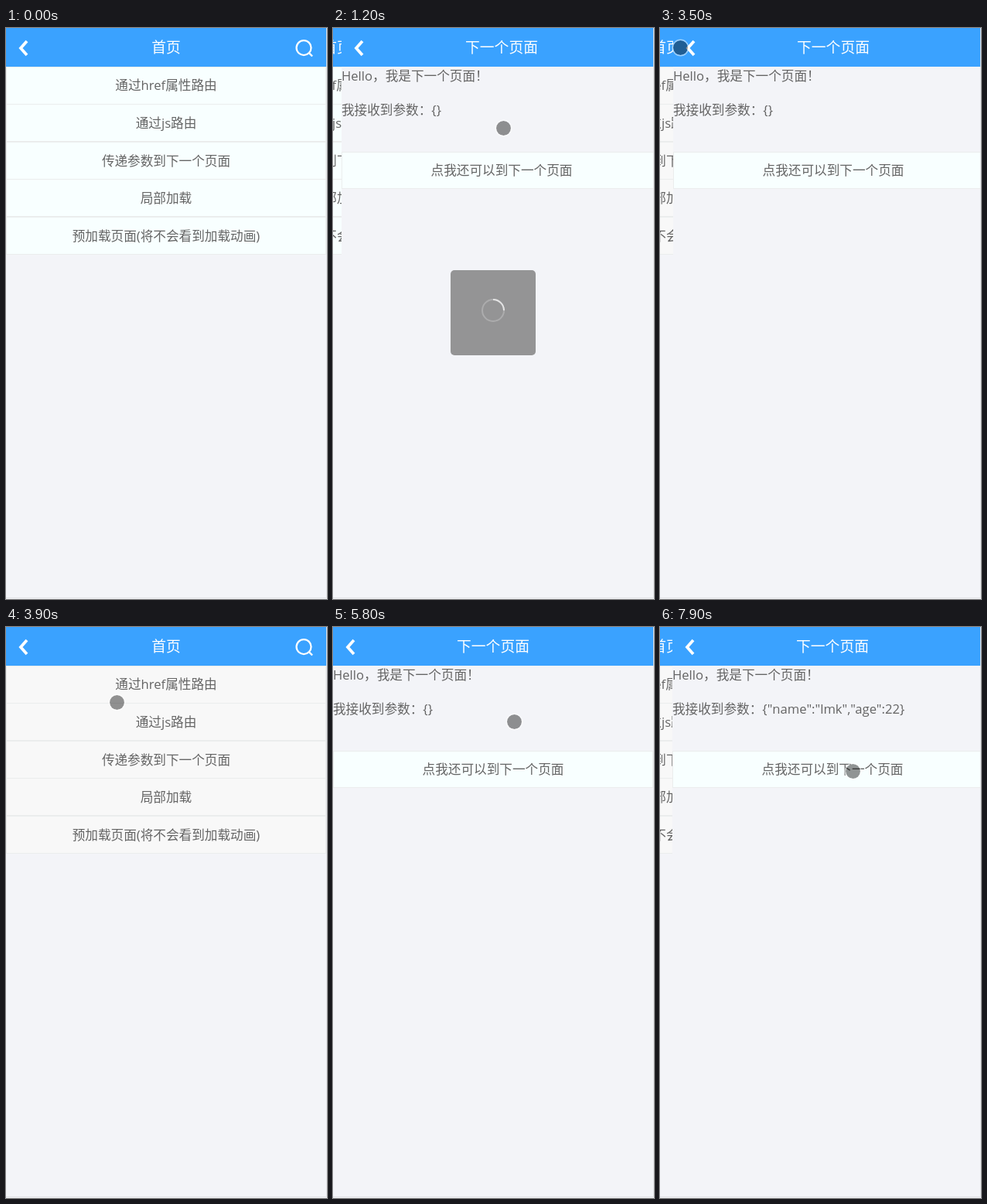
Recreate the animation shown at these times as an HTML page. Size 415x738 px, loop 8 s.

```html
<!DOCTYPE html>
<html lang="zh-CN">
<head>
<meta charset="utf-8">
<style>
  html, body { margin: 0; width: 100%; height: 100%; overflow: hidden; background: #f3f4f8; }
  svg { display: block; }
  text { font: 16.64px 'Open Sans', 'Noto Sans CJK SC', 'Noto Sans CJK', sans-serif; fill: #646464; white-space: pre; }
  .mid { text-anchor: middle; }
  .title { font-size: 18.8px; fill: #fff; text-anchor: middle; }
  .row { fill: #f8ffff; stroke: #ebeded; }
  .icon { fill: none; stroke: #fff; }
</style>
</head>
<body>
<svg id="stage" width="415" height="738" viewBox="0 0 415 738"></svg>
<script>
const LOOP = 8000, SLIDE = 350, WIDTH = 415;

const page = (id, title, content) => `
  <g id="${id}">
    <rect width="415" height="738" fill="#f3f4f8"/>
    <rect width="415" height="50" fill="#3aa2ff"/>
    <path class="icon" d="M27 17L19 26L27 35" stroke-width="3.8"/>
    <text class="title" x="207" y="32">${title}</text>
    ${content}
  </g>`;

const row = (y, height, label) => `
  <rect class="row" x=".5" y="${Math.floor(y) + .5}" width="413" height="${height}"/>
  <text class="mid" x="207" y="${Math.ceil(y) + 30}">${label}</text>`;

const links = ['通过href属性路由', '通过js路由', '传递参数到下一个页面', '局部加载', '预加载页面(将不会看到加载动画)'];
const search = `
  <circle class="icon" cx="385" cy="25.6" r="9.5" stroke-width="2.2"/>
  <path class="icon" d="M391 31.5L396 36.5" stroke-width="2.4"/>`;

document.getElementById('stage').innerHTML =
  page('home', '首页', search + links.map((label, i) => row(50 + i * 48.6, 48, label)).join('')) +
  page('next', '下一个页面', `
    <text y="68">Hello，我是下一个页面！</text>
    <text id="params" y="112"></text>
    ${row(160, 47, '点我还可以到下一个页面')}`) + `
  <path d="M414.5 0V736.5H0" fill="none" stroke="#e2e3e6"/>
  <g id="loader">
    <rect x="152" y="313" width="110" height="110" rx="5" fill="#949495"/>
    <g fill="none" stroke-width="2">
      <circle cx="207" cy="365" r="14" stroke="#acacad"/>
      <path id="spinner" d="M207 351A14 14 0 0 1 221 365" stroke="#e4e4e4"/>
    </g>
  </g>
  <g id="cursor">
    <circle cx=".5" cy=".5" r="9.5" fill="#000" fill-opacity=".42"/>
    <circle cx=".5" cy=".5" r="10.2" fill="none" stroke="#fff" stroke-opacity=".5" stroke-width="1.5"/>
  </g>`;

// Start times; the direction alternates between forward and back.
const slides = [923, 3480, 4680, 6555, 7637];

// Pointer path: time, x, y
const pointer = [
  [100, 369, 80], [700, 223, 107], [800, 223, 107], [1000, 220, 129], [1300, 220, 129],
  [1700, 49, 60], [2200, 26, 25], [3600, 26, 25], [3700, 45, 10], [3900, 143, 97],
  [4200, 234, 124], [5700, 234, 124], [5800, 234, 122], [6400, 31, 30], [6800, 31, 30],
  [7100, 180, 281], [7400, 249, 186], [8000, 249, 186]
];

const clamp = v => Math.max(0, Math.min(1, v));

// cubic-bezier(.25, .1, .25, 1)
function ease(x) {
  if (x <= 0 || x >= 1) return clamp(x);
  const curve = (s, a, b) => 3 * (1 - s) ** 2 * s * a + 3 * (1 - s) * s * s * b + s ** 3;
  let low = 0, high = 1;
  for (let i = 0; i < 20; i++) {
    const s = (low + high) / 2;
    if (curve(s, .25, .25) < x) low = s; else high = s;
  }
  return curve(low, .1, 1);
}

function pointerAt(t) {
  const i = Math.max(1, pointer.findIndex(p => p[0] >= t));
  const [t0, x0, y0] = pointer[i - 1], [t1, x1, y1] = pointer[i];
  const k = clamp((t - t0) / (t1 - t0));
  return [x0 + (x1 - x0) * k, y0 + (y1 - y0) * k];
}

const el = id => document.getElementById(id);
const show = (id, on) => el(id).setAttribute('visibility', on ? 'visible' : 'hidden');
const move = (id, x, y = 0) => el(id).setAttribute('transform', `translate(${Math.round(x)} ${Math.round(y)})`);
const homeRows = document.querySelectorAll('#home .row');

function draw(now) {
  const t = Math.floor(now % LOOP / 100) * 100;
  const open = slides.reduce((sum, start, i) => sum + (i % 2 ? -1 : 1) * ease((t - start) / SLIDE), 0);
  move('home', -WIDTH / 2 * open);
  move('next', WIDTH * (1 - open));
  move('cursor', ...pointerAt(t));
  show('cursor', t >= 100);
  show('loader', t >= 900 && t < 1400);
  el('spinner').setAttribute('transform', `rotate(${(t - 1200) * .36} 207 365)`);
  el('params').textContent = '我接收到参数：' + (t > 7000 ? '{"name":"lmk","age":22}' : '{}');
  homeRows.forEach(r => r.style.fill = t > 2200 ? '#f8f8f8' : '#f8ffff');
  requestAnimationFrame(() => draw(performance.now()));
}
draw(0);
</script>
</body>
</html>
```
